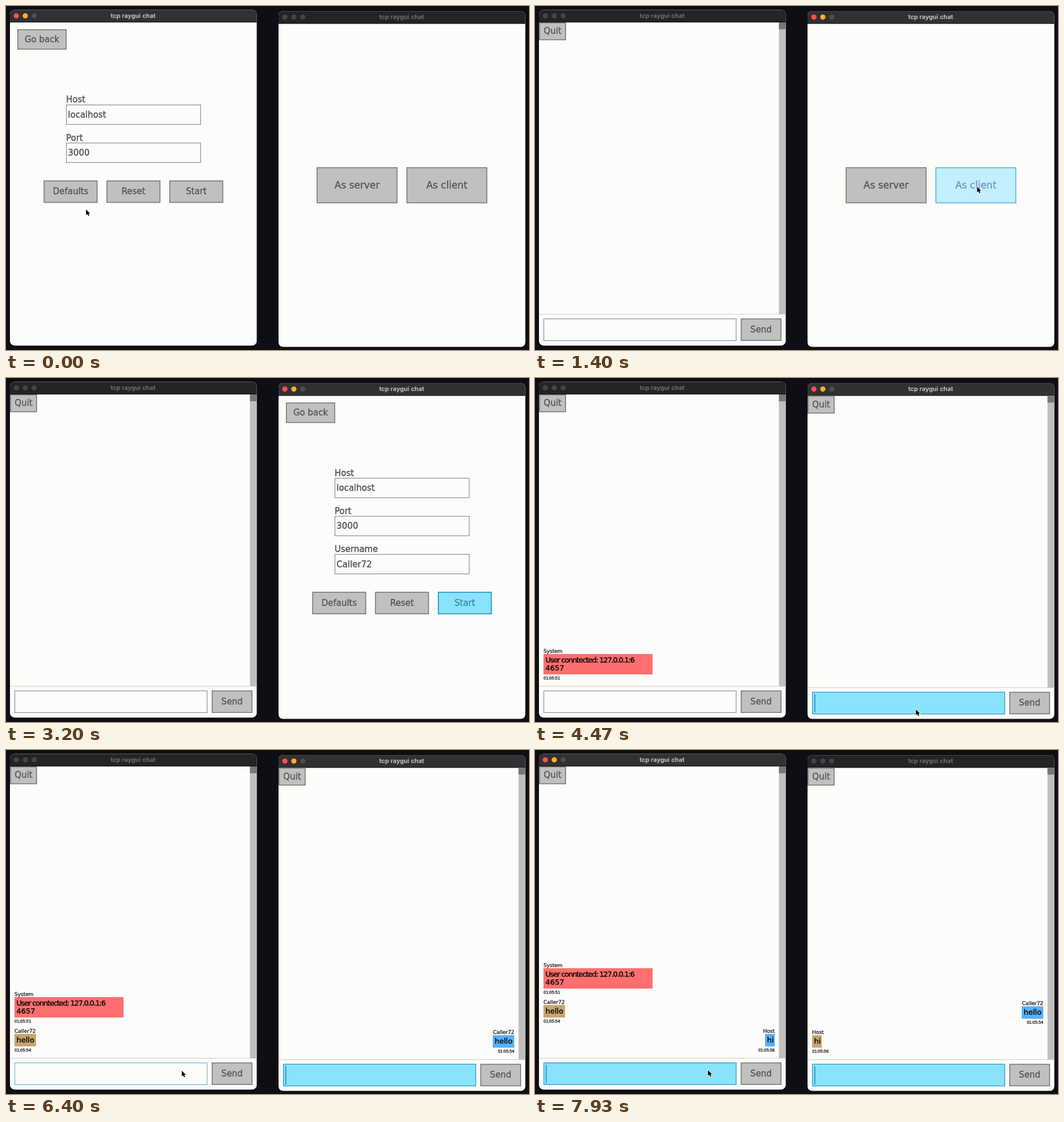
Recreate the animation shown at these times as an HTML page with a canvas. Size 923 px wide and 607 px high, loop 8 s.

```html
<!DOCTYPE html>
<html lang="en">
<head>
<meta charset="utf-8">
<title>tcp raygui chat</title>
<style>
  html, body { margin: 0; width: 100%; height: 100%; overflow: hidden; background: #0f0e14; }
  canvas { display: block; }
</style>
</head>
<body>
<canvas id="stage" width="923" height="607"></canvas>
<script>
const ctx = document.getElementById('stage').getContext('2d');
const LOOP = 8000;
const sans = size => `${size}px "DejaVu Sans", sans-serif`;
const GUEST = 'Caller72';

// Moments at which something switches, in ms
const AT = {
  serverStart: 620, clientFocus: 1270, clientForm: 1580, defaults: 2180, connect: 3260,
  clientEdit: 4270, helloTyping: 4870, hello: 5730, hostEdit: 6600, hiTyping: 7070, hi: 7600
};
const PRESSES = [[520, 620], [1480, 1580], [2080, 2180], [3130, 3260]];
const POINTER = [
  [0, 141, 358], [470, 340, 332], [620, 340, 332], [730, 352, 343], [1230, 780, 318],
  [1620, 780, 318], [1930, 608, 384], [2060, 602, 391], [2330, 602, 391], [2860, 812, 396],
  [3330, 812, 396], [4050, 672, 584], [5790, 672, 584], [6350, 310, 565], [6550, 310, 565],
  [6700, 305, 564], [LOOP, 305, 564]
];

const STYLES = {
  normal:  { border: '#7d7d74', fill: '#c0c0c0', text: '#585858' },
  focused: { border: '#5bb2d9', fill: '#c3eefc', text: '#6c9bbc' },
  pressed: { border: '#1b93c4', fill: '#8be2fc', text: '#368baf' }
};
const INK = '#515151', RED = '#ff6e6e', TAN = '#c8a570', BLUE = '#56b1fa';

let time = 0, pointer = [0, 0], mouse = [0, 0], pressing = false;

function pointerAt(t) {
  const i = POINTER.findIndex(p => p[0] > t);
  const [t0, x0, y0] = POINTER[i - 1], [t1, x1, y1] = POINTER[i];
  const k = (t - t0) / (t1 - t0), ease = k * k * (3 - 2 * k);
  return [x0 + (x1 - x0) * ease, y0 + (y1 - y0) * ease];
}

function typed(text, start, step) {
  return text.slice(0, Math.max(0, Math.floor((time - start) / step) + 1));
}

function text(str, x, y, color, { font = sans(15), align = 'left', spacing = 0, weight = 0.4 } = {}) {
  ctx.font = font;
  ctx.textAlign = align;
  ctx.textBaseline = 'middle';
  ctx.letterSpacing = spacing + 'px';
  ctx.fillStyle = ctx.strokeStyle = color;
  ctx.lineWidth = weight;
  ctx.fillText(str, x, y + 0.8);
  ctx.strokeText(str, x, y + 0.8);
}

function rect(x, y, w, h, color) {
  ctx.fillStyle = color;
  ctx.fillRect(x, y, w, h);
}

function frame(x, y, w, h, color, width) {
  ctx.strokeStyle = color;
  ctx.lineWidth = width;
  ctx.strokeRect(x + width / 2, y + width / 2, w - width, h - width);
}

function isOver(x, y, w, h) {
  return mouse[0] >= x && mouse[0] < x + w && mouse[1] >= y && mouse[1] < y + h;
}

function button(label, x, y, w, h, font) {
  const style = STYLES[!isOver(x, y, w, h) ? 'normal' : pressing ? 'pressed' : 'focused'];
  rect(x, y, w, h, style.fill);
  frame(x, y, w, h, style.border, 1.6);
  text(label, x + w / 2, y + h / 2, style.text, { align: 'center', font });
}

function textBox(value, x, y, w, h, editing = false) {
  const style = STYLES[editing ? 'pressed' : isOver(x, y, w, h) ? 'focused' : 'normal'];
  if (editing) rect(x, y, w, h, style.fill);
  frame(x, y, w, h, style === STYLES.normal ? '#85858f' : style.border, 1.1);
  text(value, x + 3.3, y + h / 2 + 0.4, editing ? style.text : INK);
  if (editing) {
    const caret = x + 4 + (value ? ctx.measureText(value).width + 1 : 0);
    rect(caret, y + 4, 1.6, h - 7, style.border);
  }
}

function form(fields) {
  button('Go back', 20, 41, 87, 36);
  fields.forEach(([label, value], i) => {
    const y = 174 + i * 67.2;
    text(label, 106, y - 8.2, INK);
    textBox(value, 106, y, 238, 35.5);
  });
  const y = 307.8 + (fields.length - 2) * 67.2;
  ['Defaults', 'Reset', 'Start'].forEach((label, i) => button(label, 66.5 + i * 110.9, y, 95, 39.5));
}

function message({ name, lines, color, stamp, width, own }, bottom) {
  const height = 8 + lines.length * 14, left = own ? 423 - width : 15, edge = own ? 423 : 15;
  const align = own ? 'right' : 'left';
  text(name, edge, bottom - height - 5.5, '#111', { font: sans(9), align, weight: 0.25 });
  rect(left, bottom - height, width, height, color);
  lines.forEach((line, i) => text(line, left + 3.5, bottom - 11.5 - (lines.length - 1 - i) * 14, '#080808',
    { font: sans(13), spacing: line.length > 5 ? -1.2 : 0 }));
  text(stamp, edge, bottom + 6.5, '#111', { font: sans(7), align, spacing: -0.3, weight: 0.25 });
}

function chat(messages, draft, editing) {
  button('Quit', 7.3, 29, 47.4, 31.3);
  rect(430.5, 29, 12, 515, '#bfbfbf');
  rect(430.5, 29, 12, 12, '#777');
  rect(7, 543.5, 436, 1, '#ccd0bb');
  let bottom = 523;
  for (const item of [...messages].reverse()) {
    message(item, bottom);
    bottom -= 37 + item.lines.length * 14;
  }
  textBox(draft, 15, 551.5, 340.5, 39.5, editing);
  button('Send', 363, 551.5, 72, 39.5);
}

function appWindow(dx, dy, active, drawContent) {
  ctx.save();
  ctx.translate(dx, dy);
  mouse = [pointer[0] - dx, pointer[1] - dy];
  ctx.beginPath();
  ctx.roundRect(7, 6.7, 435.5, 592.5, 8);
  ctx.clip();
  rect(7, 6, 436, 594, '#fcfcfa');
  rect(7, 6, 436, 23, active ? '#313133' : '#232425');
  rect(7, 6, 436, 1.6, '#4b4b4d');
  rect(7, 28, 436, 1, '#111');
  const lights = active ? ['#fe504c', '#fdb02c', '#4d4d51'] : Array(3).fill('#444446');
  lights.forEach((color, i) => {
    ctx.beginPath();
    ctx.arc(18.2 + i * 15.8, 17.3, 4.6, 0, Math.PI * 2);
    ctx.fillStyle = color;
    ctx.fill();
  });
  text('tcp raygui chat', 224.3, 16.8, active ? '#bcbcbc' : '#6b6b6b',
    { font: '600 11px Inter, sans-serif', align: 'center', weight: 0.2 });
  drawContent();
  ctx.restore();
}

function visibleMessages(onServer) {
  const list = [];
  if (onServer && time >= AT.connect) list.push({
    name: 'System', lines: ['User conntected: 127.0.0.1:6', '4657'], color: RED, stamp: '01:05:51', width: 192.5
  });
  if (time >= AT.hello) list.push({
    name: GUEST, lines: ['hello'], color: onServer ? TAN : BLUE, stamp: '01:05:54', width: 38, own: !onServer
  });
  if (time >= AT.hi) list.push({
    name: 'Host', lines: ['hi'], color: onServer ? BLUE : TAN, stamp: '01:05:56', width: 17, own: onServer
  });
  return list;
}

function server() {
  if (time < AT.serverStart) return form([['Host', 'localhost'], ['Port', '3000']]);
  chat(visibleMessages(true), time < AT.hi ? typed('hi', AT.hiTyping, 200) : '', time >= AT.hostEdit);
}

function client() {
  if (time < AT.clientForm) {
    button('As server', 74.4, 282.3, 142.6, 63.5, sans(17));
    button('As client', 232.7, 282.3, 142.6, 63.5, sans(17));
  } else if (time < AT.connect) {
    const filled = time >= AT.defaults;
    form([['Host', 'localhost'], ['Port', '3000'], ['Username', GUEST]]
      .map(([label, value]) => [label, filled ? value : '']));
  } else {
    chat(visibleMessages(false), time < AT.hello ? typed('hello', AT.helloTyping, 130) : '',
      time >= AT.clientEdit);
  }
}

function drawPointer([x, y]) {
  ctx.save();
  ctx.translate(x + 0.3, y + 1);
  ctx.scale(0.9, 0.9);
  const arrow = new Path2D('M0 0V11.2L2.6 8.8 4.4 12.8 6.3 12 4.6 8.1H8Z');
  ctx.strokeStyle = '#fff';
  ctx.lineWidth = 1.6;
  ctx.stroke(arrow);
  ctx.fillStyle = '#000';
  ctx.fill(arrow);
  ctx.restore();
}

function draw(now) {
  time = now % LOOP;
  pointer = pointerAt(time);
  pressing = PRESSES.some(([from, to]) => time >= from && time < to);
  rect(0, 0, 923, 607, '#0f0e14');
  const clientActive = time >= AT.clientFocus && time < AT.hostEdit;
  appWindow(0, 0, !clientActive, server);
  appWindow(474, 2.3, clientActive, client);
  const hidden = time >= 3170 && time < AT.connect;
  if (!hidden) drawPointer(pointer);
}

const start = performance.now();
function tick() {
  draw(performance.now() - start);
  requestAnimationFrame(tick);
}
tick();
</script>
</body>
</html>
```
